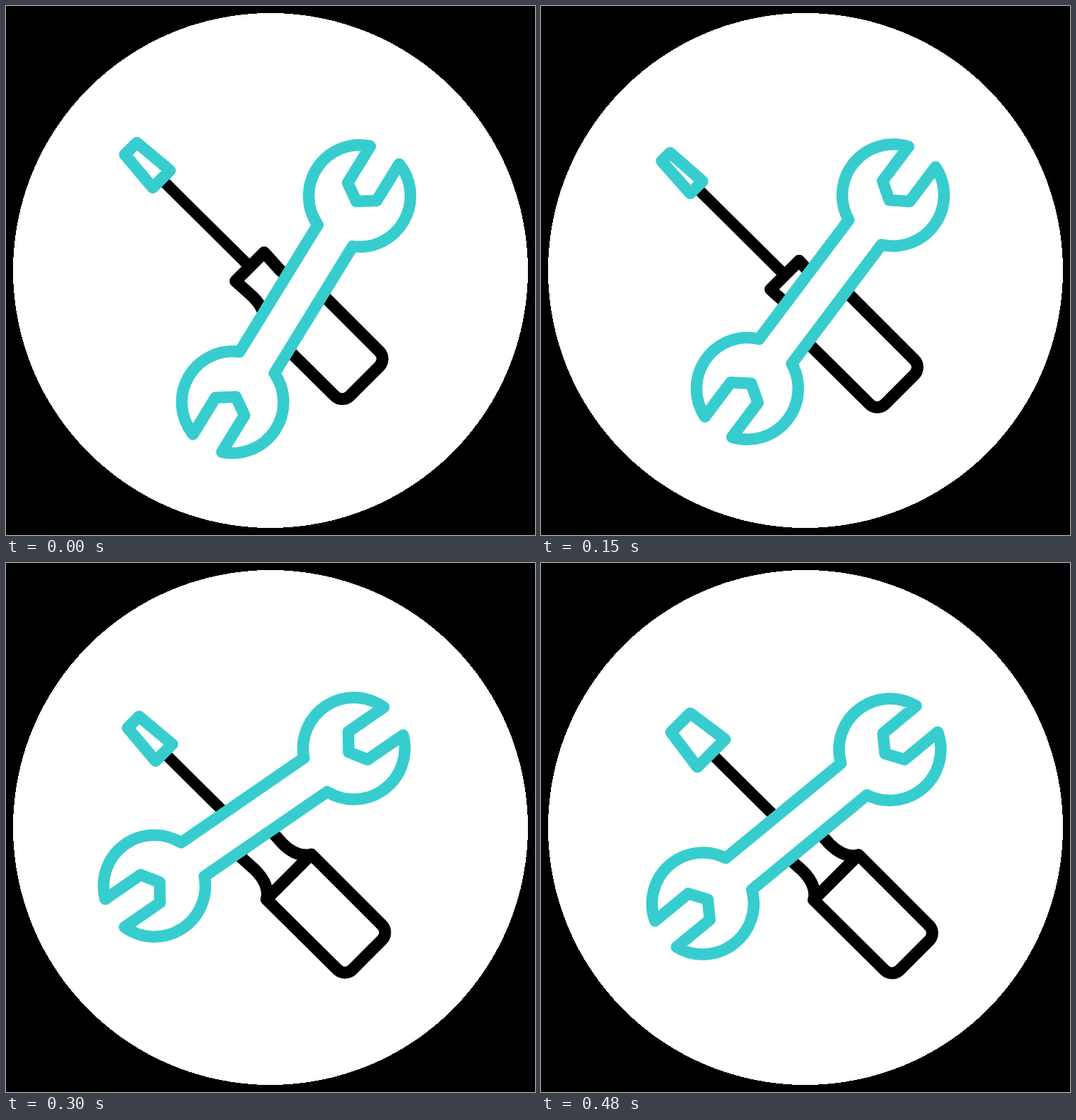
An HTML page that plays this animation: 748x748 px, repeating every 0.51 s.

```html
<!DOCTYPE html>
<html lang="en">
<head>
<meta charset="utf-8">
<title>Tools</title>
<style>
  html, body { margin: 0; width: 100%; height: 100%; overflow: hidden; background: #000; }
  svg { display: block; width: 100vw; height: 100vh; }
  .line { fill: #fff; stroke-linecap: round; stroke-linejoin: round; }
  .ink { stroke: #000; stroke-width: 17; }
  .teal { stroke: #37cdce; stroke-width: 16.5; }
</style>
</head>
<body>
<svg viewBox="0 0 748 748">
  <circle cx="374" cy="374" r="364" fill="#fff" shape-rendering="crispEdges"/>
  <g id="driver">
    <g class="line ink">
      <path d="M222 247 344 368" stroke-width="16"/>
      <path d="M365 348.5 387 373C399 385 413 392 428 389L365 452C368 437 361 423 349 411L324.5 389Z"/>
      <path d="M428 388.5 528 488.5A15 15 0 0 1 528 509.5L486 551.5A15 15 0 0 1 465 551.5L364.5 452Z"/>
    </g>
    <path id="tip" class="line teal"/>
  </g>
  <g id="wrench">
    <path class="line teal" transform="translate(24.7 -2.3)" d="M-67.8 24A72 72 0 0 0 65.9 29H276.7A72 72 0 0 0 410.4 24H349.6L333.6 0 349.6-24H410.4A72 72 0 0 0 276.7-29H65.9A72 72 0 0 0-67.8-24H-7L9 0-7 24Z"/>
  </g>
</svg>
<script>
  const LOOP = 510, STEP = 30;
  const SWING_START = 45, SWING_END = 335;

  const [driver, tip, wrench] = ['driver', 'tip', 'wrench'].map(id => document.getElementById(id));

  const after = (t, from) => Math.max(0, t - from);
  const smooth = u => u * u * u * (10 - 15 * u + 6 * u * u);

  // Swings from 120.6 to 145.8 degrees, drifting gently around both ends.
  function wrenchAngle(t) {
    const u = after(t, SWING_START) / (SWING_END - SWING_START);
    return 120.6 + 25.2 * smooth(Math.min(1, u))
      + 0.0005 * after(SWING_START, t) ** 2
      - 0.00025 * after(t, SWING_END) ** 2;
  }

  // Sinks at an even speed, then speeds up to the right.
  function driverOffset(t) {
    return [0.000218 * after(t, 170) ** 2, Math.min(24.2, 0.078 * t)];
  }

  // The blade opens, then turns about the shaft; it is edge-on at 212 ms.
  function bladeWidth(t) {
    const turn = (t - 212) * 0.4 * Math.PI / 180;
    return Math.min(12.2 + 0.13 * t, 20.5 * Math.abs(Math.sin(turn)));
  }

  function tipPath(wide) {
    const narrow = wide * 0.69;
    const at = (x, y, w) => `${x + w} ${y - w}`;
    return `M${at(176.5, 201.7, narrow)}L${at(219.7, 244.7, wide)}` +
           `L${at(219.7, 244.7, -wide)}L${at(176.5, 201.7, -narrow)}Z`;
  }

  function draw(now) {
    const t = Math.floor(now % LOOP / STEP) * STEP;
    driver.setAttribute('transform', `translate(${driverOffset(t)})`);
    tip.setAttribute('d', tipPath(bladeWidth(t)));
    wrench.setAttribute('transform', `translate(511 246.3) rotate(${wrenchAngle(t)})`);
  }

  let start;
  function tick(now) {
    start ??= now;
    draw(now - start);
    requestAnimationFrame(tick);
  }
  draw(0);
  requestAnimationFrame(tick);
</script>
</body>
</html>
```
